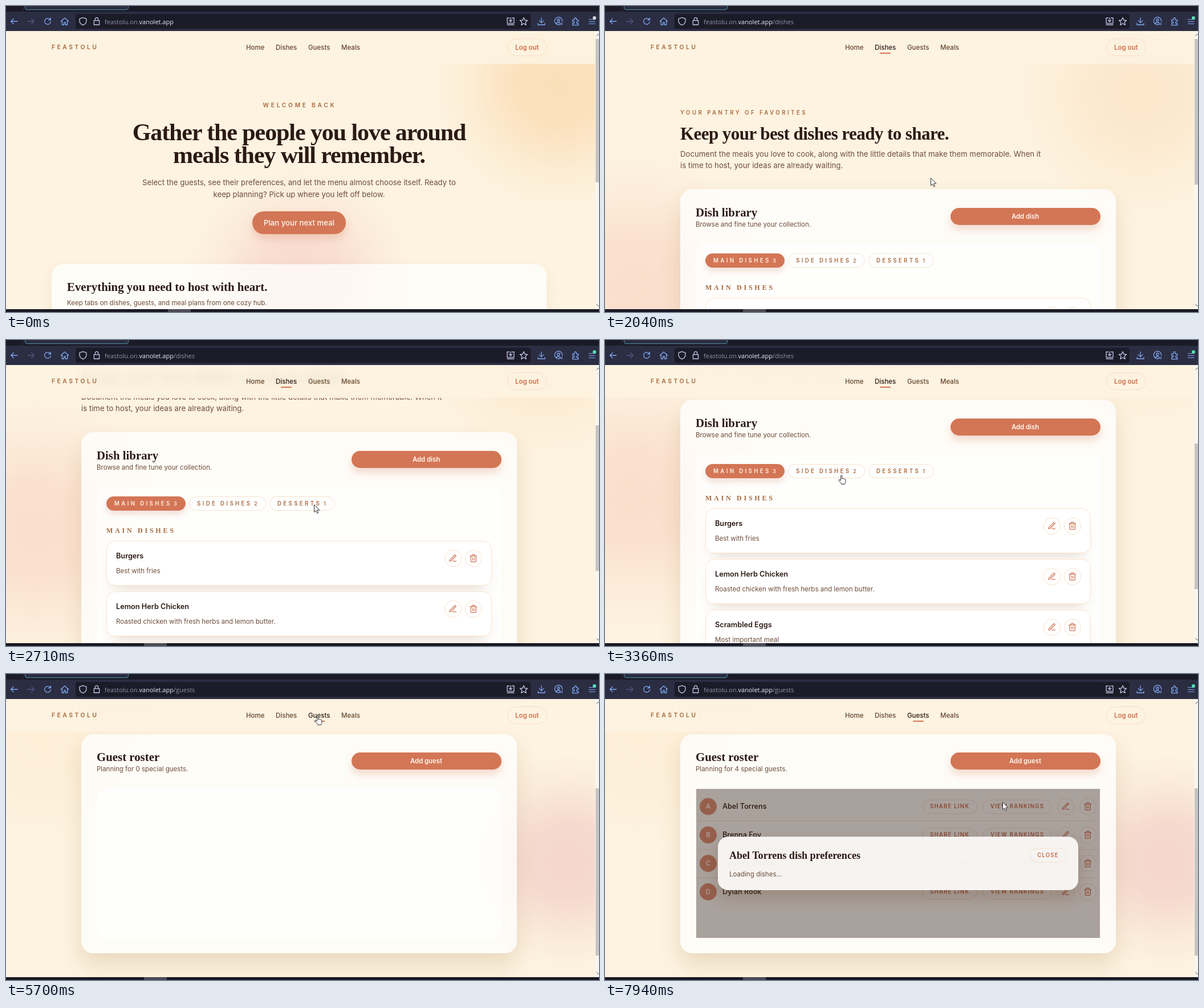
Animation, 1040 px wide and 538 px high, one loop 8 s. Source, as an HTML page:

```html
<!DOCTYPE html>
<html lang="en">
<head>
<meta charset="utf-8">
<title>Meal planner</title>
<style>
html, body { margin: 0; width: 100%; height: 100%; overflow: hidden; background: #1b1b27; }
#stage { position: absolute; left: 0; top: 0; width: 1040px; height: 538px; overflow: hidden; background: #fdf3e0; font-family: Inter, sans-serif; color: #2b1a14; }
#stage div, #stage svg { position: absolute; box-sizing: border-box; }
.t { line-height: 0; height: 0; white-space: pre; }
.mid { width: 700px; margin-left: -350px; text-align: center; }
.serif { font-family: "Liberation Serif", serif; font-weight: 700; }
.h2 { font-size: 20.85px; }
.kick { font-size: 9.65px; font-weight: 600; letter-spacing: 3.5px; color: #a8693d; }
.body { font-size: 11.52px; color: #6e4d3b; }
.lead { font-size: 13.19px; color: #6e4d3b; }
.name { font-size: 12.7px; font-weight: 600; }
.nav { font-size: 11.5px; font-weight: 500; color: #65452f; }
.small { font-size: 9.65px; font-weight: 600; letter-spacing: 1.2px; color: #c96a49; }
.btn { background: #d37656; border-radius: 20px; box-shadow: 0 8px 14px rgba(211,118,86,.26); color: #fff8f0; }
.pill { border: 1px solid #f8e2cd; border-radius: 20px; background: rgba(255,255,255,.6); }
.on { background: #d37656; border: 1px solid #d37656; border-radius: 20px; box-shadow: 0 6px 11px rgba(211,118,86,.24); }
.on .kick { color: #fff3e6; }
.card { background: rgba(255,255,255,.76); border-radius: 21px; box-shadow: 0 20px 36px rgba(160,110,55,.19); }
.panel { background: rgba(255,255,255,.72); border-radius: 15px; }
.item { background: #fff; border: 1px solid #fae4cc; border-radius: 15px; box-shadow: 0 18px 24px -14px rgba(150,100,60,.24); }
.url { font: 11px "Open Sans", sans-serif; line-height: 0; color: #9094ab; }
.url b { font-weight: 400; color: #eceef8; }
</style>
</head>
<body>
<div id="stage"></div>
<script>
const px = (x, y, w, h) => `left:${x}px;top:${y}px;` + (w ? `width:${w}px;height:${h}px;` : '');
const box = (x, y, w, h, cls = '', inner = '', css = '', id = '') =>
  `<div id="${id}" class="${cls}" style="${px(x, y, w, h)}${css}">${inner}</div>`;
const text = (x, y, s, cls, css = '', id = '') => box(x, y, 0, 0, 't ' + cls, s, css, id);
const icon = (x, y, size, color, d, width = 1.9) =>
  `<svg viewBox="0 0 24 24" fill="none" stroke="${color}" stroke-width="${width}" stroke-linecap="round" stroke-linejoin="round" style="${px(x - size / 2, y - size / 2, size, size)}"><path d="${d}"/></svg>`;
const blob = (x, y, r, rgb, a, id = '') => box(x - r, y - r, 2 * r, 2 * r, '',
  '', `background:radial-gradient(closest-side,rgba(${rgb},${a}),rgba(${rgb},${a * .88}) 35%,rgba(${rgb},${a * .3}) 72%,rgba(${rgb},0))`, id);

const PEN = 'M12 20h9M16.5 3.5a2.1 2.1 0 0 1 3 3L7 19l-4 1 1-4z';
const BIN = 'M3 6h18M19 6v14a2 2 0 0 1-2 2H7a2 2 0 0 1-2-2V6M8 6V4a2 2 0 0 1 2-2h4a2 2 0 0 1 2 2v2M10 11v6M14 11v6';
const round = (x, y, d) => box(x - 15, y - 15, 30, 30, 'pill') + icon(x, y, 15.5, '#d0704f', d);
const actions = (x1, x2, y) => round(x1, y, PEN) + round(x2, y, BIN);
const tag = (x, y, w, s) => box(x, y - 12.5, w, 25, 'pill', text(13, 11.8, s, 'small'));

function intro(kicker, title, line1, line2) {
  return text(132, 187.5, kicker, 'kick') +
    text(132, 225, title, 'serif', 'font-size:31px;letter-spacing:-.56px') +
    text(132, 260, line1, 'lead') + text(132, 280, line2, 'lead');
}
function cardTop(title, sub, button, subId) {
  return text(159, 363, title, 'serif h2') + text(159, 384, sub, 'body', '', subId) +
    box(605.5, 355, 263.5, 30, 'btn', text(131.5, 15, button, 'mid', 'font-size:11.3px;font-weight:600'));
}

const home =
  blob(968, 138, 220, '249,200,140', .46) + blob(515, 482, 200, '240,175,175', .36) +
  text(515, 174, 'WELCOME BACK', 'kick mid', 'font-size:10.25px;letter-spacing:3.7px') +
  ['Gather the people you love around', 'meals they will remember.'].map((s, i) =>
    text(514, 222 + i * 40, s, 'serif mid', 'font-size:42px;letter-spacing:-1.08px')).join('') +
  text(514, 310, 'Select the guests, see their preferences, and let the menu almost choose itself. Ready to', 'lead mid') +
  text(514, 331, 'keep planning? Pick up where you left off below.', 'lead mid') +
  box(432, 361, 164, 40, 'btn', text(82, 20.3, 'Plan your next meal', 'mid', 'font-size:13.19px;font-weight:500')) +
  box(80, 454, 868, 200, 'card', '', 'box-shadow:0 12px 26px rgba(160,110,55,.09)') +
  text(107, 494, 'Everything you need to host with heart.', 'serif h2') +
  text(107, 522, 'Keep tabs on dishes, guests, and meal plans from one cozy hub.', 'body');

const menu = [
  ['MAIN DISHES', 176, 139, 117, [['Burgers', 'Best with fries'], ['Lemon Herb Chicken', 'Roasted chicken with fresh herbs and lemon butter.'], ['Scrambled Eggs', 'Most important meal']]],
  ['SIDE DISHES', 321, 135, 113, [['Garlic Green Beans', 'Crisp beans with toasted garlic.'], ['Potato Salad', 'Creamy salad with fresh dill.']]],
  ['DESSERTS', 462, 115, 94, [['Dark Chocolate Tart', 'Silky ganache tart with sea salt flakes.']]]
];
const dishes =
  blob(940, 150, 225, '249,195,140', .25) + blob(50, 495, 235, '245,178,163', .32, 'glow') +
  intro('YOUR PANTRY OF FAVORITES', 'Keep your best dishes ready to share.',
    'Document the meals you love to cook, along with the little details that make them memorable. When it',
    'is time to host, your ideas are already waiting.') +
  box(132, 322, 764, 470, 'card', '', '', 'dishCard') +
  cardTop('Dish library', 'Browse and fine tune your collection.', 'Add dish') +
  box(159, 419, 710, 366, 'panel', '', '', 'dishPanel') +
  menu.map(([s, x, w, n, list], i) => {
    const label = text(13, 11.5, s, 'kick', 'letter-spacing:3.38px') +
      text(n, 11.8, list.length, 'kick', 'font-size:9.3px;font-weight:500');
    return box(x, 435, w, 25, 'pill', label) + box(x, 435, w, 25, 'on', label, '', 'tab' + i);
  }).join('') +
  menu.map(([s, , , , list], i) => box(0, 0, 1033, 900, '',
    text(176, 495, s, 'serif', 'font-size:12px;letter-spacing:3.75px;color:#a8693d') +
    list.map(([a, b], k) => {
      const y = 512.5 + 89 * k;
      return box(176, y, 676, 79.5, 'item') + text(193, y + 27.5, a, 'name') +
        text(193, y + 53.5, b, 'body') + actions(784, 820, y + 31.5);
    }).join(''), '', 'list' + i)).join('');

const people = ['Abel Torrens', 'Brenna Foy', 'Cosimo Velarde', 'Dylan Rook'];
const guests =
  blob(985, 547, 190, '238,190,187', .55) + blob(60, 330, 200, '249,195,140', .1) +
  intro('YOUR FAVORITE COMPANY', 'Keep every guest close at hand.',
    'Save the people you love to host, along with the dishes they enjoy the most. When you plan', 'a meal, it all is ready.') +
  box(132, 322.5, 764, 385.5, 'card') +
  cardTop('Guest roster', '', 'Add guest', 'count') +
  box(159.5, 419, 709, 262, 'panel') +
  box(0, 0, 1033, 900, '', people.map((p, i) => {
    const y = 450 + 50 * i;
    return box(166, y - 15, 30, 30, '', text(15, 15, p[0], 'mid', 'font-size:11.5px;font-weight:600;color:#fff3ea'), 'border-radius:50%;background:#de9077') +
      text(206, y + .3, p, 'name', 'font-weight:500') + tag(556, y, 97, 'SHARE LINK') +
      tag(662, y, 121, 'VIEW RANKINGS') + actions(807.5, 847, y) +
      (i < 3 ? box(163, y + 24.5, 702, 1, '', '', 'background:#f5e6d6') : '');
  }).join(''), '', 'rows') +
  box(0, 0, 1033, 900, '',
    box(159.5, 419, 708.5, 262, '', box(38.5, 84, 632, 94, '', '', 'border-radius:18px;background:rgba(249,247,245,.96);box-shadow:0 14px 26px rgba(95,55,20,.2)'),
      'background:rgba(40,22,10,.4);overflow:hidden') +
    text(218, 536, people[0] + ' dish preferences', 'serif', 'font-size:18.04px') +
    box(744.5, 523, 65, 25, 'pill', text(12.5, 11.8, 'CLOSE', 'small'), 'background:none') +
    text(218, 569, 'Loading dishes...', 'body'), '', 'modal');

const navs = [['Home', 421], ['Dishes', 473], ['Guests', 530], ['Meals', 588]];
const header = box(0, 44, 1033, 58, '',
  text(80, 29, 'FEASTOLU', 'kick', 'font-size:10.5px;letter-spacing:3.4px') +
  navs.map(([s, x], i) => text(x, 29, s, 'nav', '', 'nav' + i)).join('') +
  box(482, 38, 19, 2, '', '', 'background:#d37656;border-radius:1px', 'line') +
  box(879, 13, 70, 31, 'pill', text(13, 14.7, 'Log out', '', 'font-size:11.46px;font-weight:600;color:#d0704f'), 'background:none;border-color:#f6ddc6'),
  'background:rgba(253,243,225,.91);backdrop-filter:blur(9px);border-bottom:1px solid rgba(250,236,215,.4)');

const BLUE = '#82aaf5', PALE = '#c3cbea';
const chrome =
  box(0, 0, 1040, 10, '', '', 'background:#1b1b27') +
  box(29, 0, 1, 10, '', '', 'background:#30303f') +
  box(33, -12, 182, 19, '', '', 'background:#2a2c40;border:1px solid #4d94a8;border-radius:4px') +
  box(0, 10, 1040, 34, '', '', 'background:#2b2d42') +
  box(122, 14, 798, 26, '', '', 'background:#1c1b28;border-radius:4px') +
  icon(14, 27, 16, BLUE, 'M21 12H4M11 5l-7 7 7 7') +
  icon(44, 27, 16, '#505986', 'M3 12h17M13 5l7 7-7 7') +
  icon(73, 27, 16, BLUE, 'M20 13a8 8 0 1 1-2.5-7L20 8.5M20 3v5.5h-5.5') +
  icon(102.5, 27, 16, BLUE, 'M2 12L12 3l10 9M5 10v11h5v-6h4v6h5V10') +
  icon(135, 27, 16, PALE, 'M12 2l9 3v6c0 5-4 9-9 11-5-2-9-6-9-11V5z') +
  icon(158.5, 27, 16, PALE, 'M5 10h14v11H5zM8 10V6a4 4 0 0 1 8 0v4') +
  text(173, 27.5, 'feastolu.on.<b>vanolet.app</b><span id="path"></span>', 'url') +
  icon(885, 27, 16, PALE, 'M8 3H3v14h18V3h-5M3 21h18M12 2v10M8 9l4 4 4-4') +
  icon(908, 27, 16, PALE, 'M12 2l3 7 7 .6-5.3 4.7 1.6 7.2L12 17.7 5.7 21.5l1.6-7.2L2 9.6 9 9z') +
  icon(939, 27, 16, BLUE, 'M12 3v12M6 10l6 6 6-6M3 17v4h18v-4') +
  icon(968.5, 27, 16, BLUE, 'M18 19a10 10 0 1 1 4-7M6 18c2-4 9-4 11 0M9 9a3 3 0 1 1 6 0 3 3 0 1 1-6 0M21 16v5') +
  icon(998.5, 27, 16, BLUE, 'M4 8h5V5a2.5 2.5 0 0 1 5 0v3h5v5h-2a2.5 2.5 0 0 0 0 5h2v4H4v-5h3a2 2 0 0 0 0-4H4z') +
  icon(1027.5, 27, 15, BLUE, 'M4 6h17M4 12h17M4 18h17') +
  box(1029, 18, 6, 6, '', '', 'border-radius:50%', 'dot') +
  box(1033, 44, 7, 489, '', '', 'background:#f8f5ef') +
  icon(1039, 51, 8, '#55555c', 'M2 16L12 7l10 9', 3) + icon(1039, 526, 8, '#55555c', 'M2 8l10 9 10-9', 3) +
  box(1033.5, 58, 6.5, 252, '', '', 'background:#c5c4c3', 'thumb') +
  box(0, 533, 1040, 5, '', '', 'background:#191924') +
  box(284, 533, 40, 5, '', '', 'background:#4b4b56', 'task');

const shape = (id, d) => `<svg id="${id}" width="20" height="24" style="left:0;top:0" fill="#fff" stroke="#30303a" stroke-width="1" stroke-linejoin="round"><path d="${d}"/></svg>`;
const cursor = box(0, 0, 20, 24, '',
  shape('arrow', 'M.5.5v13.2l3-2.8 2.1 4.8 2-.9-2-4.7h4.2z') +
  shape('hand', 'M4.5 10V1.8c0-1.7 2.2-1.7 2.2 0V7c.5-1 2-.8 2.2.3.6-.9 1.9-.6 2.1.5.7-.7 1.9-.3 1.9.9V12c0 2-1 2.7-1.2 4.5H6C5.7 14.5 3 13 1 10c-.8-1.4 1-2.2 1.9-1.1z'), '', 'cursor');

const $ = id => document.getElementById(id);
$('stage').innerHTML = [home, dishes, guests].map((s, i) => box(0, 0, 1033, 900, '', s, '', 'page' + i)).join('') + header + chrome + cursor;

const moves = [[240, 873, 471], [430, 630, 290], [620, 618, 276], [1330, 487, 74], [1720, 487, 74], [2040, 571, 302],
  [2425, 571, 302], [2710, 540, 289], [2950, 540, 289], [3360, 409, 237], [4210, 409, 237], [4350, 487, 232],
  [4830, 487, 232], [5370, 541, 73], [6300, 541, 73], [6680, 620, 207], [6900, 620, 207], [7110, 692, 222],
  [7190, 692, 222], [7360, 738, 225], [7780, 738, 225], [7940, 697, 225]];
const scrolls = [[2425, 0], [2430, 40], [2530, 100], [2710, 160], [2895, 160], [2900, 172], [3200, 217]];
const fades = [[7495, 0], [7500, .35], [7690, 1]];
const hands = [[1250, 1740], [3200, 4880], [5290, 6340], [7250, 7800]];

function at(keys, t, k = 1) {
  const i = keys.findIndex(p => p[0] > t);
  if (i === 0) return keys[0][k];
  if (i < 0) return keys[keys.length - 1][k];
  const a = keys[i - 1], b = keys[i];
  return a[k] + (b[k] - a[k]) * (t - a[0]) / (b[0] - a[0]);
}
const show = (id, on) => $(id).style.display = on ? 'block' : 'none';

function draw(t) {
  const page = t < 1500 ? 0 : t < 5520 ? 1 : 2;
  const tab = t < 3770 ? 0 : t < 4590 ? 1 : 2;
  const loaded = t >= 1900, scroll = at(scrolls, t);
  for (let i = 0; i < 3; i++) {
    show('page' + i, i === page);
    $('page' + i).style.top = -scroll + 'px';
    show('list' + i, i === tab && loaded);
  }

  // the previous tab fades out for one short beat
  const fading = t >= 3770 && t < 3890 || t >= 4590 && t < 4710;
  for (let i = 0; i < 3; i++)
    $('tab' + i).style.opacity = i === tab ? (fading ? .93 : 1) : fading && i === tab - 1 ? .15 : 0;
  const count = loaded ? 3 - tab : 1;
  const tall = Math.max(230, 100.5 + 89 * count);
  $('dishPanel').style.height = tall + 'px';
  $('dishCard').style.height = tall + 124 + 'px';
  $('glow').style.top = [495, 440, 415][tab] - 235 + 'px';

  show('rows', t >= 6090);
  $('count').textContent = `Planning for ${t < 6090 ? 0 : 4} special guests.`;
  $('modal').style.opacity = at(fades, t);

  navs.forEach((n, i) => $('nav' + i).style.color = page && i === page ? '#2b1a14' : '');
  show('line', page > 0);
  $('line').style.left = (page === 2 ? 540 : 482) + 'px';
  $('path').textContent = ['', '/dishes', '/guests'][page];
  $('dot').style.background = t < 620 ? '#d8dae4' : '#58e0b4';
  $('task').style.left = (t < 620 ? 284 : 242) + 'px';

  const [len, rate] = page === 0 ? [252, 0] : page === 2 ? [294, .66] : loaded ? [[256, .573], [285, .63], [308, .691]][tab] : [308, 0];
  $('thumb').style.top = 58 + scroll * rate + 'px';
  $('thumb').style.height = len + 'px';

  const hand = hands.some(([a, b]) => t >= a && t < b);
  show('cursor', t >= 240);
  show('hand', hand);
  show('arrow', !hand);
  $('cursor').style.left = at(moves, t) + 'px';
  $('cursor').style.top = at(moves, t, 2) + 'px';
}

const start = performance.now();
function tick(now) {
  draw(Math.max(0, now - start) % 8000);
  requestAnimationFrame(tick);
}
draw(0);
requestAnimationFrame(tick);
</script>
</body>
</html>
```
